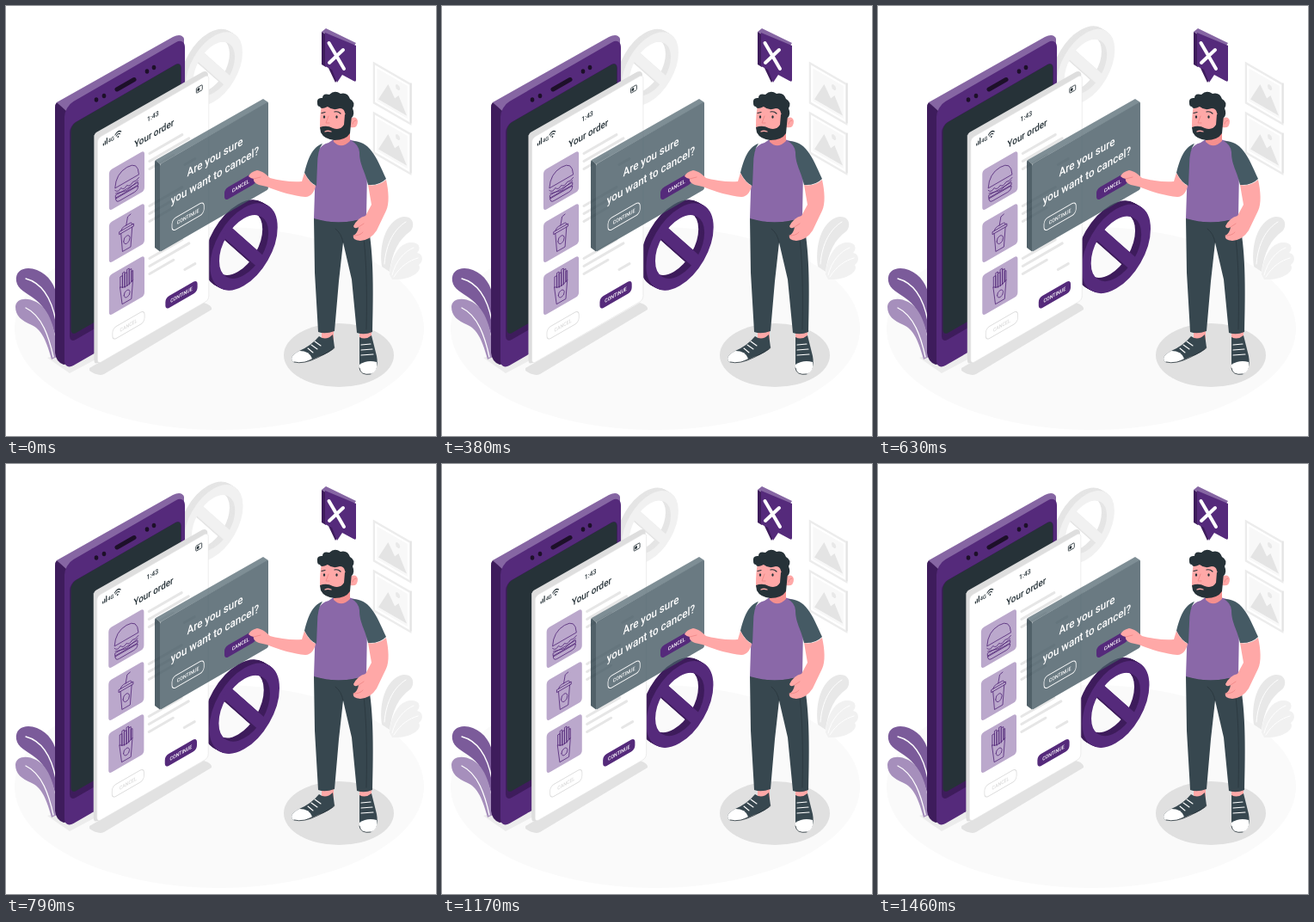
These frames come from a looping animation (500x500 px, 1.5 s). An HTML page:

```html
<!DOCTYPE html>
<html lang="en">
<head>
<meta charset="utf-8">
<title>Cancel order</title>
<style>
  html, body { margin: 0; width: 100%; height: 100%; overflow: hidden; background: #fff; }
  svg { display: block; width: 100vw; height: 100vh; }
  text { font-family: Roboto, Inter, sans-serif; font-weight: 500; text-anchor: middle; }
  .line { fill: none; stroke-linecap: round; stroke-linejoin: round; }
</style>
</head>
<body>
<script>
const PURPLE = '#552a7b', DEEP = '#3e1c5c', PALE = '#8666a3', INK = '#263238', SKIN = '#ffa8a7';

// Isometric planes: facing right, or facing left when flipped
const iso = (x, y, body, flip) => `<g transform="matrix(.866 ${flip ? .5 : -.5} 0 1 ${x} ${y})">${body}</g>`;
const path = (d, fill) => `<path d="${d}" fill="${fill}"/>`;
const line = (d, color, width = 1) => `<path class="line" d="${d}" stroke="${color}" stroke-width="${width}"/>`;
const panel = (x, y, w, h, r, attrs) => iso(x, y, `<rect width="${w}" height="${h}" rx="${r}" ${attrs}/>`);
const label = (x, y, size, fill, text) => iso(x, y, `<text font-size="${size}" fill="${fill}">${text}</text>`);
const ellipse = (x, y, rx, ry, fill) => `<ellipse cx="${x}" cy="${y}" rx="${rx}" ry="${ry}" fill="${fill}"/>`;
const dot = (x, y, r, fill) => ellipse(x, y, r, r, fill);

const button = (x, y, text, attrs, color) =>
  panel(x, y, 43, 14, 5, attrs) + label(x + 18.6, y - 1.6, 6.1, color, text);

function banRing(x, y, r, depth, face, side) {
  const w = r * .27, mid = r - w / 2;
  const layer = (d, color) => iso(x - .866 * d, y - .5 * d,
    `<g fill="none" stroke="${color}" stroke-width="${w}"><circle r="${mid}"/>
     <path d="M${-mid * .62} ${-mid * .785}L${mid * .62} ${mid * .785}"/></g>`);
  let out = '';
  for (let d = depth; d > 0; d--) out += layer(d, side);
  return out + layer(0, face);
}

const floor = ellipse(248, 375, 238, 118, '#fafafa')
  + path('M48 409L74 427L106 410V390Z', '#ececec')
  + path('M97 421L230 345Q240 348 239 353L114 428Q107 431 97 424Z', '#e2e2e2')
  + ellipse(387, 406, 64, 37, '#e0e0e0');

const picture = y => iso(427, y, `
  <rect x="1" y="1" width="49" height="46" fill="#fff" stroke="#ececec" stroke-width="2.6"/>
  <rect x="5" y="5" width="41" height="38" fill="#f8f8f8"/>
  <path d="M7 40L20 16L29 28L34 22L45 40Z" fill="#e4e4e4"/><circle cx="33" cy="13" r="3" fill="#e8e8e8"/>`, true)
  + line(`M471 ${y + 25}v46`, '#e2e2e2', 1.4);

const greyPlant = path('M437 303C433 272 445 248 462 245C474 244 476 256 470 262C457 271 449 286 446 309Z', '#e8e8e8')
  + path('M446 312C448 290 458 276 470 275C481 274 483 282 478 287C485 288 486 297 480 301C485 309 470 319 449 318Z', '#f1f1f1')
  + line('M440 300C442 275 452 259 465 251M449 313C453 296 464 285 474 281M451 315C459 302 469 296 479 293', '#fff');

const purplePlant = path('M12 320C10 306 24 302 36 307C50 313 58 325 59 340V390C53 365 45 350 35 342C22 332 14 330 12 320Z', '#7b5b9a')
  + path('M11 350C11 340 24 338 35 344C50 352 59 375 59 408L53 411C46 385 40 376 30 371C18 366 11 360 11 350Z', '#a68fbc')
  + line('M23 317C42 322 53 341 58 366M23 351C42 360 50 385 55 408', '#fff', 1.3);

const rings = banRing(242, 73.5, 38, 7, '#f1f1f1', '#e5e5e5')
  + banRing(276.5, 279.5, 45, 8, PURPLE, DEEP);

const phone = path('M59 112L194 36Q204 31 207 38V60L80 130L68 122Z', PALE)
  + path('M70 122L59 112Q57 114 57 118V403Q58 414 67 417L82 414Z', DEEP)
  + panel(68, 117, 161.7, 307, 12, `fill="${PURPLE}"`)
  + panel(74, 139, 150, 253, 8, `fill="${DEEP}"`)
  + panel(75.5, 138.5, 147.5, 245, 7, `fill="${INK}"`)
  + line('M129 97L149 85.5', '#1d1029', 5)
  + [[105, 109], [114, 104.5], [164, 76], [172, 71.5]].map(([x, y]) => ellipse(x, y, 2.3, 2.7, '#1d1029')).join('');

const icons = [
  'M8 24Q9 8 24 8Q39 8 40 24ZM8 27q4 5 8 1q4 5 8 1q4 4 8 0q4 2 8-1M9 31L24 35L39 31M9 33H39V36H9ZM9 37H39Q39 42 34 42H14Q9 42 9 37Z',
  'M14 17H33V20H14ZM16 20L18 42H29L31 20M16 17Q17 14 20 14H28Q31 14 31 17M23 14L25 5L29 4M19.5 31a4.2 4.5 0 1 0 8.4 0a4.2 4.5 0 1 0-8.4 0',
  'M15 21Q23 27 32 21L30 42H18ZM15 21V9H18V23M18 23V6H21V24M21 24V8H24V24M24 24V5H27V24M27 23V7H30V22M30 22V10H32V21M20 33a4 4 0 1 0 8 0a4 4 0 1 0-8 0'
];
const product = (icon, i) => {
  const y = 191.5 + i * 61;
  return iso(120, y, `<rect width="47.5" height="47" rx="4" fill="#bba8cc"/>${line(icon, PURPLE, .8)}`)
    + line(`M167 ${y - 20}l38-21.9M167 ${y - 11}l46-26.6M167 ${y - 2}l28-16.2M208 ${y - 7}l12-6.9`, '#e6e6e6', 3);
};

const sheet = path('M108 160L103 151Q102.500 149 105 147L229 76.500Q234 75 235 79V90ZM102.500 150L108 153V415L104 415.500Q102.500 414 102.500 411Z', '#dedede')
  + panel(106.5, 154, 149.5, 262.5, 5, 'fill="#fff" stroke="#e3e3e3" stroke-width=".6"')
  + line('M113.500 162v-2M115.500 161v-4M117.500 160v-6.500', INK, 1.2)
  + label(122.5, 157.5, 6.5, INK, '4G')
  + iso(130.5, 151, line('M-4-3Q0-7 4-3M-2.500-1Q0-3.500 2.500-1', INK, 1.1) + dot(0, 1, 1, INK))
  + label(171, 131, 8, INK, '1:43')
  + iso(221.5, 95.5, `<rect width="8" height="6" rx="1" fill="none" stroke="${INK}" stroke-width=".8"/><rect x="1.300" y="1.300" width="3" height="3.400" fill="${INK}"/>`)
  + label(172.3, 152, 11.4, INK, 'Your order')
  + icons.map(product).join('')
  + button(185.5, 339.5, 'CONTINUE', `fill="${PURPLE}"`, '#fff')
  + button(124, 375, 'CANCEL', 'fill="#fff" stroke="#dcdcdc" stroke-width=".9"', '#dadada');

const dialog = `<g opacity=".8">${path('M174 179L299 108L305 112L179 184Z', '#5f727b')
  + path('M174 179Q173 180 173 182V281L179 285.500V184Z', '#263a44')
  + panel(179, 184, 145.5, 102, 2, 'fill="#455a64"')}</g>`
  + label(243, 180, 13.4, '#fff', 'Are you sure')
  + label(243, 201.5, 13.4, '#fff', 'you want to cancel?')
  + button(193, 248.5, 'CONTINUE', 'fill="none" stroke="#fff" stroke-width=".9"', '#fff')
  + button(254, 213, 'CANCEL', `fill="${PURPLE}"`, '#fff');

const badge = path('M367 30L372 26L407 43L402 50Z', PALE)
  + path('M367 30L372 33V71L367 68Z', DEEP)
  + path('M374 70L383 89L391 78Z', DEEP)
  + path('M371 31L407 46V86Q407 89 404 87L391 80L385 89L379 74L371 70Z', PURPLE)
  + line('M375.500 43L393 73M392 51L376 66', '#fff', 4);

const shoes = path('M367 378H381V390H367ZM411 378H425V389H411Z', SKIN)
  + path('M364 384Q372 390 380 382L382 397Q376 404 363 408Q345 417 334 414Q328 408 341 401Q355 395 364 384Z', '#37474f')
  + path('M341 401Q353 401 356 410Q344 417 334 414Q328 408 341 401Z', '#fff')
  + path('M411 385Q418 389 425 383L431 407Q434 424 424 428Q412 430 411 420Z', '#37474f')
  + path('M411 417Q420 411 431 414Q433 425 424 428Q412 430 411 421Z', '#fff')
  + line('M335 414Q346 417 363 408.500T382 397.500M411 421Q412 430 424 428', INK, .8)
  + line('M355 394l7 5M359 390l7 5M351 398l6 5M413 394l11-1M413 400l13-1M413 406l14-1', '#fff', 1.1);

const body = path('M358 246Q388 256 419 245C426 275 428 310 426 379Q417 383 408 380L402 318L392 275L387 320L382 378Q371 382 363 379L359 310Z', '#37474f')
  + line('M392 275Q390 264 383 259M413 251Q421 290 419 376', INK, .6)
  + path('M375 159C364 162 361 170 360 185L358 247Q388 256 419 246L420 190C421 175 418 163 409 158L398 155H381Z', '#8a68a8')
  + path('M380 143L381 158Q390 167 400 157V138Z', '#f58f8e')
  + path('M368 160C356 164 351 178 347 194Q353 206 361 209L362 185Q362 168 368 160Z', '#455a64')
  + path('M402 157C423 157 430 174 442 201Q434 209 421 208C417 190 411 185 411 170Q410 161 402 157Z', '#455a64')
  + path('M347 194L344 204C332 205 318 203 307 200C302 195 298 192 292 191Q284 193 282 198Q285 201 288 201Q287 205 294 208L303 210C318 216 335 221 348 222C355 222 359 215 360 209Q352 205 347 194Z', SKIN)
  + path('M421 208Q433 210 442 202C445 215 446 230 442 238L431 261Q424 272 412 273Q402 272 404 267Q409 264 410 257Q405 260 404 256Q409 246 418 244L425 231Z', SKIN)
  + line('M288 201L296 199M410 257L416 253M404 267Q412 267 415 263', '#ee8584', .8);

const head = path('M367 116Q365 125 365 140Q367 155 383 155Q397 152 400 141Q409 143 409 134Q408 128 402 130L396 111Z', SKIN)
  + path('M402 127L400 148Q395 156 382 156Q370 155 366 147L365 141Q373 138 380 142Q389 145 393 138L394 126Z', INK)
  + path('M362 113Q361 106 368 107Q368 101 376 103Q382 97 389 102Q397 100 400 108Q407 112 403 119Q406 126 402 130L397 131Q395 128 394 124Q393 119 388 119Q380 122 374 117Q366 121 365 117Q362 117 362 113Z', INK)
  + ellipse(370, 129, 1.2, 1.7, INK) + ellipse(384.5, 129, 1.2, 1.7, INK)
  + line('M367 124.500L371 123.500M382 123Q386 122 389 125', INK, 1.2)
  + line('M375 128L372 136H376M403 137Q404 133 407 133', '#ee8584', .9)
  + line('M371 146Q374 144.500 378 146', SKIN, 1.3);

document.body.innerHTML = `<svg viewBox="0 0 500 500">
  ${floor}${picture(65)}${picture(123)}${greyPlant}${purplePlant}
  <g id="rings">${rings}</g>${phone}<g id="sheet">${sheet}</g>${dialog}
  ${badge}${shoes}${body}${head}</svg>`;

const LOOP = 1500, PHASE = 20;
const SHAKE = [[0, 0], [150, -1], [300, 2], [450, -4], [600, 4], [750, -4], [900, 4], [1050, -4], [1200, 2], [1350, -1], [LOOP, 0]];
const BEAT = [[0, 1], [210, 1.05], [420, 1], [840, 1.05], [975, 1], [LOOP, 1]];

function sample(keys, t) {
  const i = keys.findIndex(([time]) => time > t);
  const [t0, v0] = keys[i - 1], [t1, v1] = keys[i];
  return v0 + (v1 - v0) * (t - t0) / (t1 - t0);
}

const ringGroup = document.getElementById('rings'), sheetGroup = document.getElementById('sheet');
function draw() {
  const t = (performance.now() + PHASE) % LOOP;
  ringGroup.setAttribute('transform', `translate(261 178) scale(${sample(BEAT, t)}) translate(-261 -178)`);
  sheetGroup.setAttribute('transform', `translate(${sample(SHAKE, t)} 0)`);
  requestAnimationFrame(draw);
}
draw();
</script>
</body>
</html>
```
